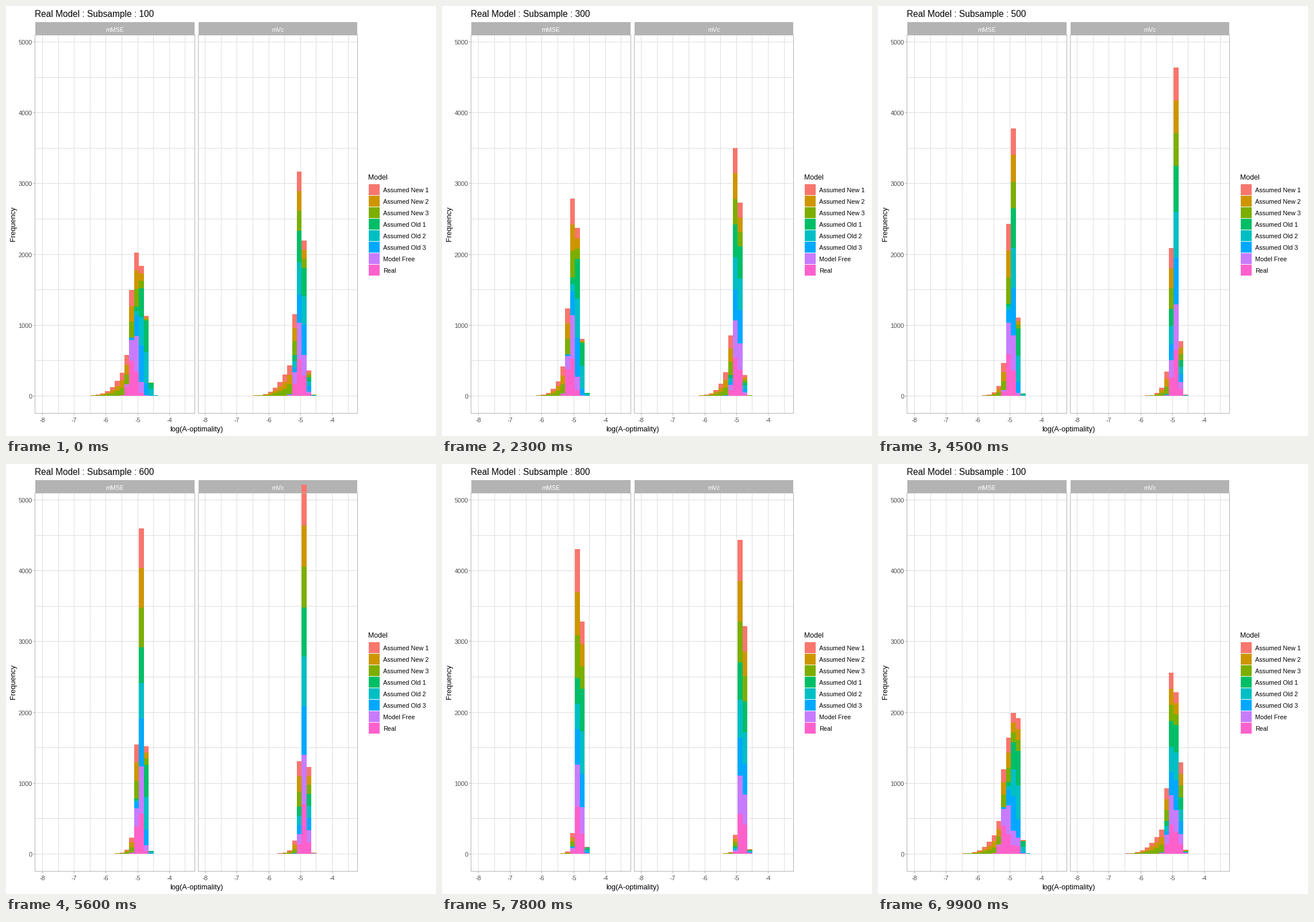
A matplotlib script for the animation above (10 s loop, 748 px wide and 748 px high).

```python
from math import erf, sqrt

import numpy as np
import matplotlib.pyplot as plt
from matplotlib.animation import FuncAnimation
from matplotlib.patches import Polygon, Rectangle

plt.rcParams["font.family"] = "Liberation Sans"

SIZE, DPI, FRAMES, STATES = 748, 100, 100, 9
MODELS = ["Real", "Model Free", "Assumed Old 3", "Assumed Old 2",
          "Assumed Old 1", "Assumed New 3", "Assumed New 2", "Assumed New 1"]
COLORS = ["#FF61CC", "#C77CFF", "#00A9FF", "#00BFC4",
          "#00BE67", "#7CAE00", "#CD9600", "#F8766D"]
GRID, FRAME, TICK_TEXT = "#DEDEDE", "#B3B3B3", "#4D4D4D"
BINS, BIN_W, ZERO, UNIT = 30, 8.41, 678.25, 0.1231
SAMPLES = 1000

# Median position in bins at subsample sizes 100, 300, 500, 700 and 900
KEYS = np.linspace(0, 1, 5)
MEDIANS = {
    "mMSE": {"Real": (18.78, 19.16, 19.82, 20.44, 21.05),
             "Free": (19.31, 19.50, 20.04, 20.60, 21.11),
             "Old 3": (20.35, 20.20, 20.47, 20.80, 21.16),
             "Old": (21.05, 20.76, 20.86, 21.08, 21.23),
             "New": (18.65, 19.10, 19.88, 20.50, 21.08)},
    "mVc": {"Real": (19.65, 19.83, 20.33, 20.72, 21.10),
            "Free": (19.67, 19.85, 20.34, 20.72, 21.12),
            "Old 3": (20.04, 20.03, 20.38, 20.73, 21.14),
            "Old": (19.93, 19.99, 20.34, 20.74, 21.15),
            "New": (18.83, 19.36, 20.07, 20.57, 21.10)},
}
GROUPS = ["Real", "Free", "Old 3", "Old", "Old", "New", "New", "New"]
phi = np.vectorize(lambda z: (1 + erf(z / sqrt(2))) / 2)


def histogram(s, group, median):
    """Counts per bin; s runs from 0 (size 100) to 1 (size 900)."""
    d = np.arange(BINS + 1) - np.interp(s, KEYS, median)
    if group == "New":
        # Long left tail that shrinks as the subsample grows
        shrink = (1 - s) ** 1.5
        left, right, power = 0.3 + 2.2 * shrink, 0.42 + 0.78 * shrink, 0.95 - 0.45 * s
    else:
        left = right = 0.45 + 0.25 * (1 - s) ** 2
        power = 1
    z = np.where(d < 0, -(np.abs(d) / left) ** power, d / right)
    return SAMPLES * np.diff(phi(z))


def stacked(s, medians):
    return np.cumsum([histogram(s, g, medians[g]) for g in GROUPS], axis=0)


# Stacked heights indexed by state, panel, model and bin
tops = np.array([[stacked(s, m) for m in MEDIANS.values()]
                 for s in np.linspace(0, 1, STATES)])

fig = plt.figure(figsize=(SIZE / DPI, SIZE / DPI), dpi=DPI, facecolor="white")
ax = fig.add_axes([0, 0, 1, 1])
ax.set_xlim(0, SIZE)
ax.set_ylim(SIZE, 0)
ax.axis("off")


def box(x, y, w, h, color, z=1):
    ax.add_patch(Rectangle((x, y), w, h, fc=color, lw=0, zorder=z,
                           antialiased=False, snap=False))


def label(x, y, s, px, color="black", ha="left", va="baseline", **kw):
    return ax.text(x, y, s, fontsize=px * 72 / DPI, color=color,
                   ha=ha, va=va, **kw)


def y_pix(v):
    return np.floor(ZERO - v * UNIT)


def draw_panel(name, left, width, x8, bar_left):
    """Draw one facet; return its bar edges and one outline per model."""
    for v in range(0, 5001, 500):
        box(left, y_pix(v), width, 1, GRID)
    for i in range(10):
        x = round(x8 + i * 27.6)
        box(x, 50, 1, 659, GRID)
        if i % 2 == 0:
            box(x, 709, 1, 3, FRAME) if i < 9 else None
            label(x + 0.5, 724, f"-{8 - i // 2}", 10.8, TICK_TEXT, "center")
    box(left + 1, 28, width - 2, 22, FRAME)
    label(left + width / 2, 45, name, 10.6, "white", "center")
    for y in (50, 708):
        box(left, y, width, 1, FRAME, 4)
    for x in (left, left + width - 1):
        box(x, 50, 1, 659, FRAME, 4)
    # Tallest stack first, lower ones painted over it
    shapes = [ax.add_patch(Polygon([(0, 0), (0, 1), (1, 1)], fc=color, lw=0,
                                   zorder=3 - m / 10, antialiased=False,
                                   snap=False))
              for m, color in enumerate(COLORS)]
    edges = np.round(bar_left + BIN_W * (1.5 + np.arange(BINS + 1)))
    return np.repeat(edges, 2), shapes


for v in range(0, 5001, 1000):
    box(47, y_pix(v), 3, 1, FRAME)
    label(45.5, y_pix(v) + 5, str(v), 10.9, TICK_TEXT, "right")

panels = [draw_panel("mMSE", 50, 279, 63, 50.5),
          draw_panel("mVc", 334, 278, 346.2, 333.6)]

title = label(50, 19, "", 15.55)
label(331, 740, "log(A-optimality)", 12.7, ha="center")
label(13.5, 379, "Frequency", 12.8, ha="center", va="center", rotation=90)
label(630, 302, "Model", 12.4)
for i, (name, color) in enumerate(zip(MODELS[::-1], COLORS[::-1])):
    box(631, 310 + 20 * i, 19, 19, color)
    label(656, 324 + 20 * i, name, 10.9)

# Each state rests, then moves linearly to the next one
STARTS = np.array([6, 18, 30, 41, 52, 63, 74, 85, 96])
STEPS = np.array([6, 6, 5, 5, 5, 5, 5, 5, 5])


def draw(frame):
    pos = np.clip((frame - STARTS + 1) / STEPS, 0, 1).sum()
    a, t = int(pos), pos % 1
    now = tops[a % STATES] * (1 - t) + tops[(a + 1) % STATES] * t
    nearest = int(pos + 0.5) % STATES
    title.set_text(f"Real Model : Subsample : {(nearest + 1) * 100}")
    base = y_pix(0)
    for (xs, shapes), stack in zip(panels, now):
        for shape, heights in zip(shapes, stack):
            ys = np.r_[base, np.repeat(y_pix(heights), 2), base]
            shape.set_xy(np.column_stack([xs, ys]))
    return [title]


anim = FuncAnimation(fig, draw, frames=FRAMES, interval=100,
                     repeat=True, repeat_delay=0, blit=False)
plt.show()
```
